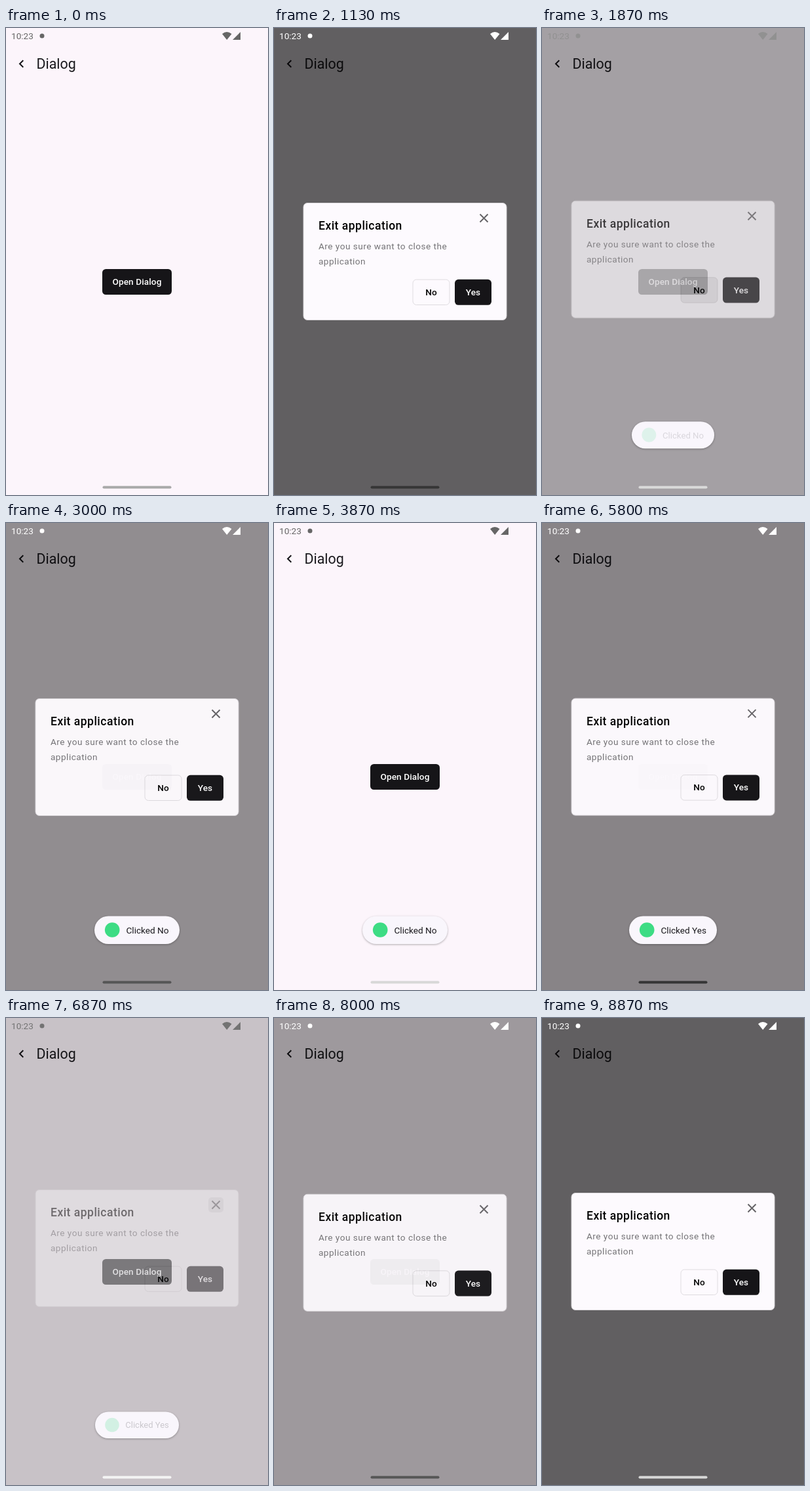
An HTML page that plays this animation: 400 by 711 pixels, repeating every 8940 ms.

```html
<!DOCTYPE html>
<html lang="en">
<head>
<meta charset="utf-8">
<title>Dialog demo</title>
<style>
  html, body { margin: 0; width: 100%; height: 100%; overflow: hidden; background: #fcf5fb; }
  svg { display: block; width: 100vw; height: 100vh; font: 13.6px Roboto, sans-serif; }
  .medium { font-weight: 500; letter-spacing: .1px; text-anchor: middle; }
  .title { font-size: 17.5px; font-weight: 500; letter-spacing: .48px; }
  .body { letter-spacing: .48px; fill: #757477; }
  #toast { filter: drop-shadow(0 1.5px 1.5px rgba(0, 0, 0, .3)); }
</style>
</head>
<body>
<svg viewBox="0 0 400 711">
  <rect width="400" height="711" fill="#fcf5fb"/>
  <path d="M26.3 49.3 21 54.5l5.300 5.200" fill="none" stroke="#141317" stroke-width="2"/>
  <text x="46.500" y="62" font-size="21.400" fill="#1a191d">Dialog</text>
  <rect x="147" y="367" width="106" height="39" rx="5.500" fill="#161518"/>
  <text class="medium" x="200" y="391.300" fill="#fff">Open Dialog</text>

  <rect id="dim" width="400" height="711"/>

  <g id="dialog">
    <rect x="45" y="266.500" width="310" height="178" rx="6" fill="#fdfafe" stroke="#d9d6da"/>
    <text class="title" x="68" y="307">Exit application</text>
    <text class="body" x="68" y="337">Are you sure want to close the</text>
    <text class="body" x="68" y="360.300">application</text>
    <rect class="press" x="309" y="278" width="23" height="23" rx="5"/>
    <path d="m314.500 283.500 12 12m0-12-12 12" stroke="#666468" stroke-width="2"/>
    <rect x="212" y="383" width="56" height="38.500" rx="5.500" fill="none" stroke="#dfdce0"/>
    <rect class="press" x="212" y="383" width="56" height="38.500" rx="5.500"/>
    <text class="medium" x="240" y="406.800">No</text>
    <rect x="276" y="382.800" width="56" height="39" rx="5.500" fill="#161518"/>
    <rect class="press" x="276" y="383" width="56" height="39" rx="5.500" fill="#fff"/>
    <text class="medium" x="304" y="406.800" fill="#fff">Yes</text>
  </g>

  <g id="toast">
    <rect id="pill" y="598.500" height="42.500" rx="21.250" fill="#f9f6fc"/>
    <g id="message">
      <circle id="icon" cy="619.500" r="11.300" fill="#3ddc84"/>
      <text id="label" y="624.700" fill="#1a191d"></text>
    </g>
  </g>

  <g id="status">
    <text x="8" y="17">10:23</text>
    <circle cx="55" cy="12" r="3.500"/>
    <path d="M330 9q7-6 14.500 0L337.200 18zM358 6v12h-12z"/>
  </g>
  <rect id="handle" x="147.500" y="697.300" width="105" height="4" rx="2"/>
</svg>

<script>
const LOOP = 8940, FPS = 15;
const DIM = 0.61, OPEN_MS = 260, CLOSE_MS = 180;

// pressed: index of the control that closes the dialog (0 close icon, 1 No, 2 Yes)
const dialogs = [
  { open: 850, close: 1790, pressed: 1 },
  { open: 2818, close: 3620, pressed: 2 },
  { open: 5603, close: 6748, pressed: 0 },
  { open: 7840, close: Infinity, pressed: -1 },
];
const toasts = [
  { text: 'Clicked No', start: 1788, end: 4200, half: 65 },
  { text: 'Clicked Yes', start: 4570, end: 6787, half: 67 },
];
// Navigation handle brightness over time
const handleKeys = [
  [0, 170], [700, 54], [1200, 54], [1900, 225], [2150, 238], [3180, 54], [3950, 236],
  [5050, 54], [6030, 54], [6850, 243], [7070, 243], [8200, 54], [8940, 232],
];

const $ = id => document.getElementById(id);
const pressAreas = document.querySelectorAll('.press');
const clamp = x => Math.min(1, Math.max(0, x));
const easeOut = (x, power) => 1 - (1 - x) ** power;
const gray = v => `rgb(${v},${v},${v})`;

function sample(keys, t) {
  const i = Math.max(1, keys.findIndex(key => key[0] >= t));
  const [t0, v0] = keys[i - 1], [t1, v1] = keys[i];
  return v0 + (v1 - v0) * clamp((t - t0) / (t1 - t0));
}

function drawDialog(t) {
  const current = dialogs.find(d => t >= d.open && t < d.close + CLOSE_MS);
  let dim = 0, alpha = 0, shift = 0, light = 0;
  const closing = current && t >= current.close;
  if (closing) {
    const p = (t - current.close) / CLOSE_MS;
    dim = 1 - p;
    alpha = 1 - 0.84 * p;
    shift = -7.5 * p;
    light = (1 - p) ** 2.3;
  } else if (current) {
    const p = clamp((t - current.open) / OPEN_MS);
    dim = p;
    alpha = easeOut(p, 3);
    shift = 18 * (1 - p) ** 2.4;
    light = clamp(2 * p);
  }
  $('dim').setAttribute('opacity', DIM * dim);
  $('dialog').setAttribute('opacity', alpha);
  $('dialog').setAttribute('transform', `translate(0 ${shift})`);
  $('status').setAttribute('fill', gray(102 + 153 * light));
  pressAreas.forEach((area, i) =>
    area.setAttribute('opacity', closing && current.pressed === i ? 0.08 : 0));
}

function drawToast(t) {
  const toast = toasts.find(o => t >= o.start && t < o.end + 140);
  $('toast').style.display = toast ? '' : 'none';
  if (!toast) return;
  const age = t - toast.start, leaving = Math.max(0, t - toast.end);
  const scale = 0.9 + 0.1 * easeOut(clamp(age / 240), 3) - 0.045 * leaving / 80;
  const left = 200 - toast.half;
  $('pill').setAttribute('x', left);
  $('pill').setAttribute('width', 2 * toast.half);
  $('icon').setAttribute('cx', left + 27.2);
  $('label').setAttribute('x', left + 48.5);
  $('label').textContent = toast.text;
  $('message').setAttribute('opacity', clamp((age - 58) / 150) * clamp(1 - leaving / 100));
  $('toast').setAttribute('opacity', clamp(age / 60) * clamp((140 - leaving) / 55));
  $('toast').setAttribute('transform',
    `translate(200 619.75) scale(${scale}) translate(-200 -619.75)`);
}

function frame(now) {
  const t = Math.floor((now % LOOP + 4) * FPS / 1000) * 1000 / FPS;
  drawDialog(t);
  drawToast(t);
  $('handle').setAttribute('fill', gray(sample(handleKeys, t)));
  requestAnimationFrame(() => frame(performance.now() - start));
}
const start = performance.now();
frame(0);
</script>
</body>
</html>
```
